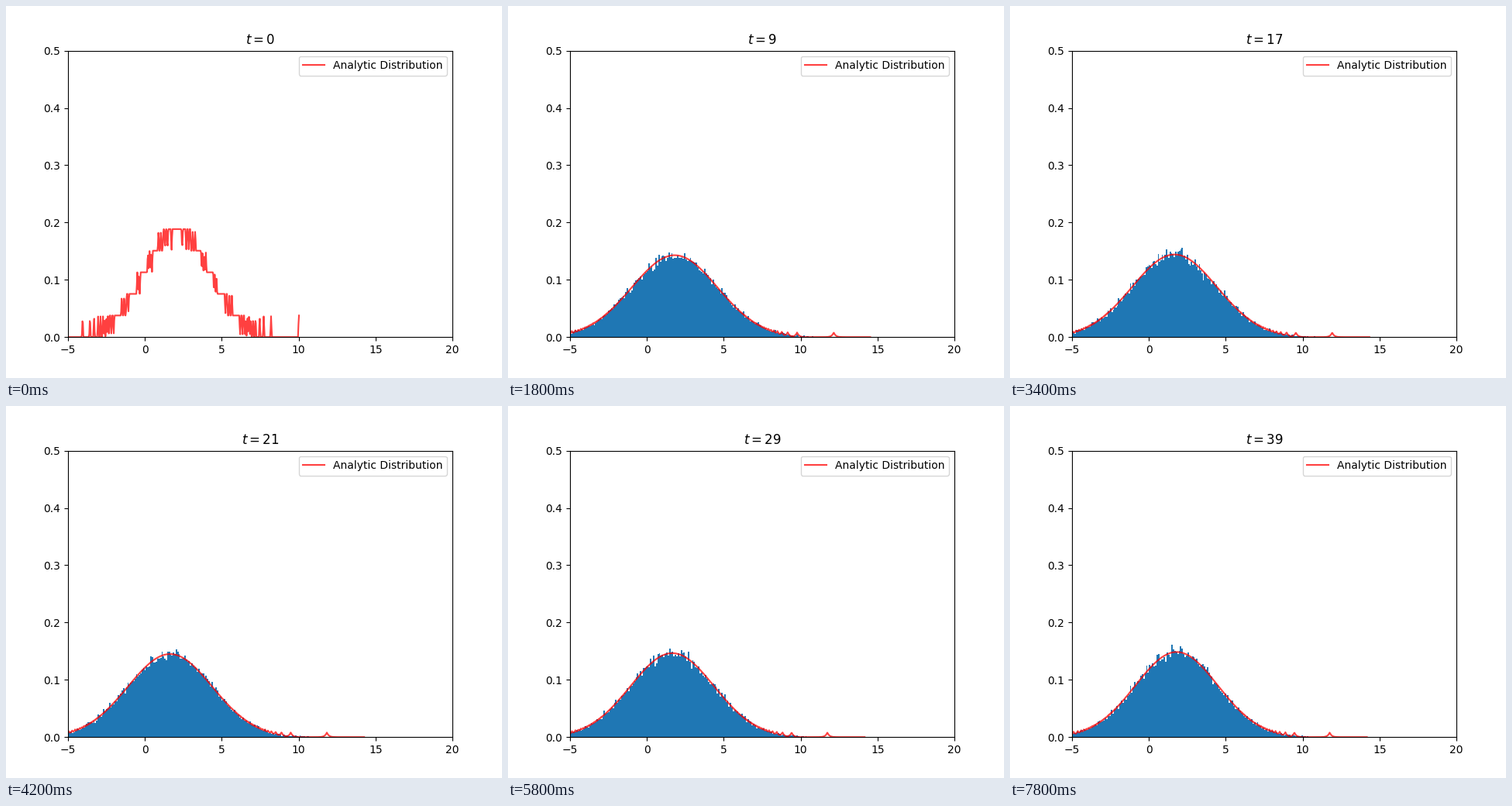
Animation of 640 by 480 pixels, one loop 8 s. Source, as a matplotlib script:

```python
import math

import numpy as np
import matplotlib.pyplot as plt
from matplotlib.animation import FuncAnimation

FRAMES = 40
INTERVAL = 200
PARTICLES = 500
SAMPLES = 50000
BINS = 250


def normal_quantiles(n):
    """Evenly spaced quantiles of the standard normal."""
    z = np.linspace(-6, 6, 2401)
    cdf = [0.5 * (1 + math.erf(v / math.sqrt(2))) for v in z]
    return np.interp(np.linspace(1e-4, 1 - 1e-4, n), cdf, z)


UNIT = normal_quantiles(PARTICLES)


def state(t):
    """Mean, spread and kernel width at time t."""
    mean = 1.63 + 0.00078 * (t - 24) ** 2
    spread = 2.82 - 0.0037 * t - 0.68 * math.exp(-t / 1.8)
    width = 0.125 * (1 - math.exp(-t / 2.3))
    return mean, spread, width


def analytic(t):
    """Curve of the particle density, smoothed once the kernel has width."""
    mean, spread, width = state(t)
    pos = mean + spread * UNIT
    margin = 19.4 * width
    x = np.linspace(pos[0] - margin, pos[-1] + margin, 2 * PARTICLES)
    if width == 0:
        x = x[::2]
        dens, edges = np.histogram(pos, bins=300, density=True)
        return x, np.interp(x, (edges[1:] + edges[:-1]) / 2, dens)
    kernel = np.exp(-np.abs(x[:, None] - pos) / width) / (2 * width)
    return x, kernel.mean(axis=1)


def draw(t):
    ax.clear()
    if t > 0:
        mean, spread, _ = state(t)
        rng = np.random.default_rng(t)
        ax.hist(rng.normal(mean, spread, SAMPLES), bins=BINS, density=True)
    ax.plot(*analytic(t), color="red", alpha=0.75, label="Analytic Distribution")
    ax.set_xlim(-5, 20)
    ax.set_ylim(0, 0.5)
    ax.set_title(f"$t = {t}$")
    ax.legend(loc="upper right")
    return []


fig, ax = plt.subplots(figsize=(6.4, 4.8), dpi=100)
anim = FuncAnimation(fig, draw, frames=FRAMES, init_func=lambda: draw(0),
                     interval=INTERVAL, repeat=True, repeat_delay=0)
plt.show()
```
